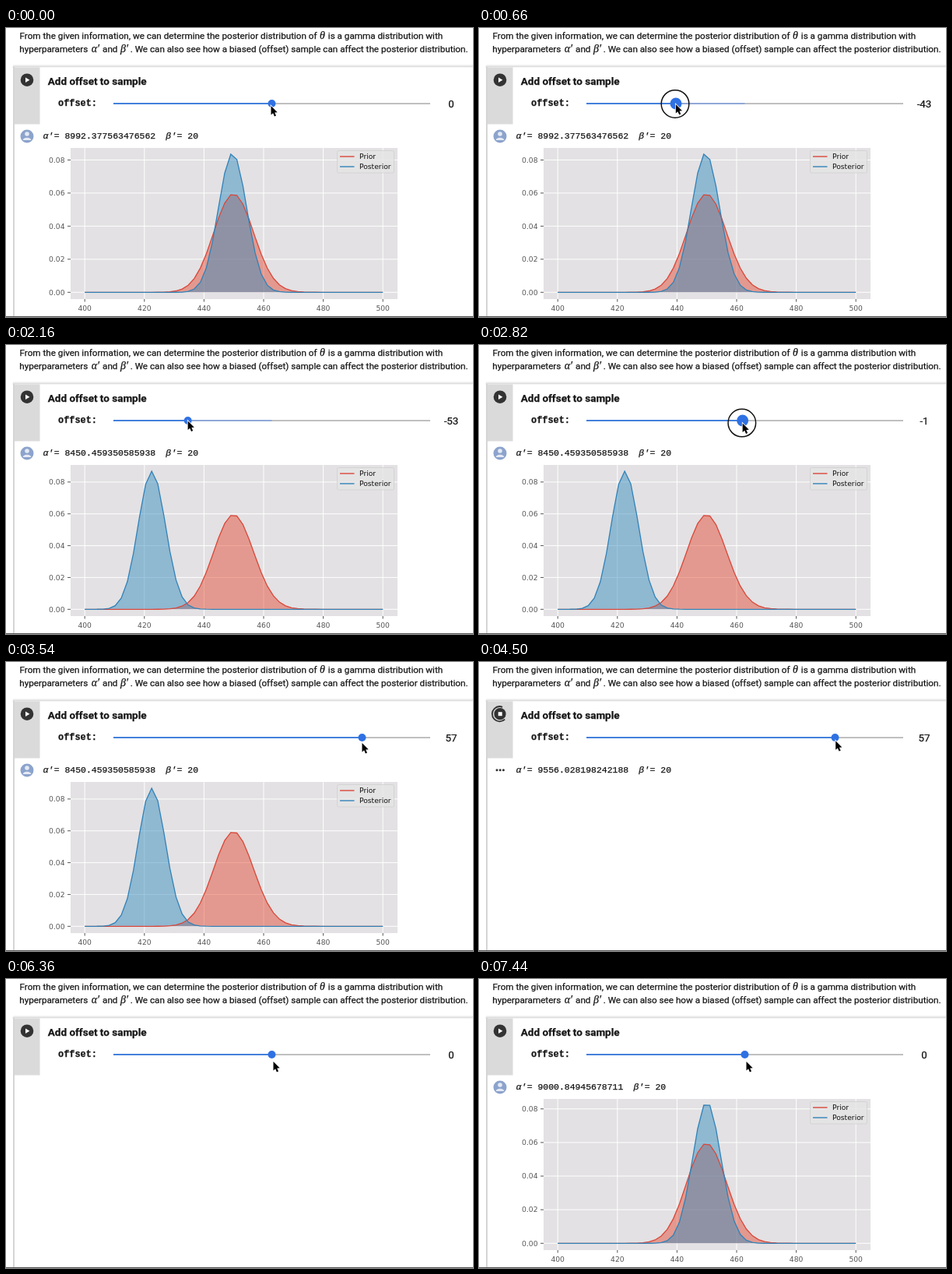
Recreate the animation shown at these times as an HTML page with a canvas. Size 600 by 371 pixels, loop 7.5 s.

```html
<!DOCTYPE html>
<html lang="en">
<head>
<meta charset="utf-8">
<style>
html, body { margin: 0; width: 100%; height: 100%; overflow: hidden; background: #fff; }
canvas { display: block; }
</style>
</head>
<body>
<canvas id="stage" width="600" height="371"></canvas>
<script>
const canvas = document.getElementById('stage');
const ctx = canvas.getContext('2d');
const ratio = window.devicePixelRatio || 1;
canvas.width = 600 * ratio;
canvas.height = 371 * ratio;
canvas.style.width = '600px';
canvas.style.height = '371px';

const LOOP = 7500;
const ROBOTO = 'Roboto, sans-serif';
const MATH = '"Liberation Serif", serif';
const MONO = '"Liberation Mono", monospace';
const DEJAVU = '"DejaVu Sans", sans-serif';
const INK = '#161616', BLUE = '#2f71e3', RED = '#d9473a', PLOT_BLUE = '#3182b8';

// time, offset value, pointer dx from the thumb, pointer y
const poses = [
  [0, 0, -1, 100], [150, 0, -1, 100], [850, -53, 0, 97.5], [2380, -53, 0, 97.5],
  [3300, 57, 0, 104], [3900, 57, 0, 104], [4300, 57, 0.7, 101.2], [4740, 57, 0.7, 101.2],
  [5597, 0, 0, 105], [5900, 0, 2, 106], [LOOP, 0, 2, 106]
];
const drags = [[100, 920], [2330, 3370], [4690, 5720]];
// Each run clears the output, starts the spinner, prints, then plots.
const runs = [
  { clear: -4, spin: -3, print: -2, plot: -1, alpha: '8992.377563476562', step: 0.02 },
  { clear: 1060, spin: 1500, print: 1860, plot: 2100, alpha: '8450.459350585938', step: 0.02 },
  { clear: 3620, spin: 3900, print: 4260, plot: 4640, alpha: '9556.028198242188', step: 0.01 },
  { clear: 6060, spin: 6600, print: 6960, plot: 7200, alpha: '9000.84945678711', step: 0.02 }
];

function poseAt(t) {
  const i = poses.findIndex(p => p[0] > t);
  const a = poses[i - 1], b = poses[i];
  const u = (t - a[0]) / (b[0] - a[0]);
  const k = u * u * (3 - 2 * u);
  return a.map((v, j) => v + (b[j] - v) * k);
}

function text(str, x, y, font, color = INK, align = 'left') {
  ctx.font = font;
  ctx.fillStyle = color;
  ctx.textAlign = align;
  ctx.fillText(str, x, y);
  if (color !== INK) return;
  // A hairline outline gives page text its slightly heavier weight.
  ctx.strokeStyle = color;
  ctx.lineWidth = 0.25;
  ctx.strokeText(str, x, y);
}

function rect(x, y, w, h, color) {
  ctx.fillStyle = color;
  ctx.fillRect(x, y, w, h);
}

function disc(x, y, r, color) {
  ctx.beginPath();
  ctx.arc(x, y, r, 0, 2 * Math.PI);
  ctx.fillStyle = color;
  ctx.fill();
}

function trace(points) {
  ctx.beginPath();
  points.forEach(([x, y]) => ctx.lineTo(x, y));
}

function stroke(points, color, width) {
  trace(points);
  ctx.strokeStyle = color;
  ctx.lineWidth = width;
  ctx.stroke();
}

function gammaPdf(x, alpha, beta) {
  const logGamma = (alpha - 0.5) * Math.log(alpha) - alpha + Math.log(2 * Math.PI) / 2 + 1 / (12 * alpha);
  return Math.exp(alpha * Math.log(beta) + (alpha - 1) * Math.log(x) - beta * x - logGamma);
}

function drawHeader() {
  const body = '11.7px ' + ROBOTO, math = 'italic 14px ' + MATH;
  text('From the given information, we can determine the posterior distribution of', 17.5, 13.8, body);
  text('θ', 403, 13.8, math);
  text('is a gamma distribution with', 413.8, 13.8, body);
  text('hyperparameters', 17.2, 30.9, body);
  const tail = '. We can also see how a biased (offset) sample can affect the posterior distribution.';
  text(tail, 593.5, 30.9, body, INK, 'right');
  const left = 593.5 - ctx.measureText(tail).width;
  text('β′', left - 2.5, 30.9, math, INK, 'right');
  text('and', left - 16.2, 30.9, body, INK, 'right');
  text('α′', left - 39.6, 30.9, math, INK, 'right');
}

function drawCard() {
  for (let i = 0; i < 4; i++) rect(9.5 - i / 3, 46.5 + i, 591, 1, `rgba(0,0,0,${0.02 + i * 0.045})`);
  rect(9, 50, 2, 320, '#d5d5d5');
  rect(11, 50.5, 589, 319.5, '#fff');
  rect(11, 50.5, 32.5, 73, '#dadada');
  rect(0, 370, 600, 1, '#555');
  text('Add offset to sample', 53.7, 72.7, 'bold 13.5px ' + ROBOTO);
  text('offset:', 67, 100, 'bold 11.9px ' + MONO);
}

function drawButton(t, running) {
  disc(27, 66.7, running ? 7.6 : 8.3, '#333');
  if (!running) {
    trace([[25, 63.4], [25, 70], [30.4, 66.7]]);
    ctx.fillStyle = '#fff';
    ctx.fill();
    return;
  }
  const turn = t / 1000 * 2 * Math.PI - 2.35;
  ctx.beginPath();
  ctx.arc(26.5, 66.7, 9.6, turn, turn + 4.3);
  ctx.strokeStyle = '#333';
  ctx.lineWidth = 1.8;
  ctx.stroke();
  rect(24.7, 64.2, 5, 5, '#fff');
}

function drawAvatar() {
  disc(27, 139, 8.5, '#8ca3cc');
  disc(27, 136, 2.8, '#e4eaf4');
  ctx.beginPath();
  ctx.ellipse(27, 144, 5.3, 3.2, 0, Math.PI, 0);
  ctx.fill();
}

function drawSlider(t, value, dragging) {
  const x = 341.5 + value * 2.035;
  rect(138, 96.2, 407, 1.8, '#b9b9b9');
  if (t > 150 && t < 2380) rect(x, 96.3, 341.5 - x, 1.4, '#7d9fe2');
  rect(138, 96, x - 138, 2, '#4480dc');
  disc(x, 97, dragging ? 7.5 : 5, BLUE);
  text(String(Math.round(value)), 572, 101.7, '13.3px ' + ROBOTO, INK, 'center');
  return x;
}

function drawPlot({ alpha, step }) {
  const font = '9.2px ' + DEJAVU, base = 339.3;
  const grid = Array.from({ length: 50 }, (_, i) => 400 + i * 100 / 49);
  const prior = grid.map(x => gammaPdf(x, 4500, 10));
  const posterior = grid.map(x => gammaPdf(x, +alpha, 20));
  const scale = (base - 162) / Math.max(...posterior);
  const px = x => 101.2 + (x - 400) * 3.83;

  rect(83, 154, 420, 194, '#e3e1e3');
  for (let x = 400; x <= 500; x += 20) {
    stroke([[px(x), 154], [px(x), 348]], '#fff', 1);
    stroke([[px(x), 348], [px(x), 351.5]], '#555', 1);
    text(String(x), px(x), 362.5, font, '#555', 'center');
  }
  for (let i = 0; i * step < 0.081; i++) {
    const y = base - i * step * scale;
    stroke([[83, y], [503, y]], '#fff', 1);
    stroke([[79, y], [83, y]], '#555', 1);
    text((i * step).toFixed(2), 75.5, y + 3.3, font, '#555', 'right');
  }

  const curves = [[prior, RED, 'rgba(226,74,51,.48)'], [posterior, PLOT_BLUE, 'rgba(52,138,189,.48)']]
    .map(([pdf, line, fill]) => ({ line, fill, points: pdf.map((p, i) => [px(grid[i]), base - p * scale]) }));
  for (const { points, fill } of curves) {
    trace(points);
    ctx.fillStyle = fill;
    ctx.fill();
  }
  for (const { points, line } of curves) stroke(points, line, 1.3);

  ctx.beginPath();
  ctx.roundRect(425.5, 157.5, 73, 28.5, 2);
  ctx.fillStyle = 'rgba(229,229,229,.8)';
  ctx.fill();
  ctx.strokeStyle = '#d0d0d0';
  ctx.lineWidth = 0.8;
  ctx.stroke();
  [['Prior', RED], ['Posterior', PLOT_BLUE]].forEach(([label, color], i) => {
    const y = 165 + i * 13;
    stroke([[429, y], [447.5, y]], color, 1.4);
    text(label, 454, y + 3.2, font, '#111');
  });
}

function drawOutput(t) {
  const next = runs.findIndex(r => r.clear > t);
  const run = runs[next < 0 ? runs.length - 1 : next - 1];
  drawButton(t, t >= run.spin && t < run.plot);
  if (t < run.print) return;
  const font = '11.45px ' + MONO;
  const gap = ' '.repeat(run.alpha.length + 4);
  text(`α′${gap}β′`, 47.5, 141.8, 'italic ' + font);
  text(`   = ${run.alpha}    = 20`.slice(1), 48 + 0, 141.8, font);
  if (t < run.plot) {
    for (let i = 0; i < 3; i++) disc(23 + i * 4.2, 138.8, 1.5, '#333');
  } else {
    drawAvatar();
    drawPlot(run);
  }
}

function drawPointer(x, y, dragging) {
  if (dragging) {
    ctx.beginPath();
    ctx.arc(x - 0.8, y - 0.5, 17.8, 0, 2 * Math.PI);
    ctx.strokeStyle = '#111';
    ctx.lineWidth = 1.5;
    ctx.stroke();
  }
  trace([[0, 0], [0, 11.5], [2.6, 9.2], [4.4, 13.4], [6.5, 12.5], [4.7, 8.5], [8.2, 8.3]]
    .map(([dx, dy]) => [x + dx, y + dy]));
  ctx.closePath();
  ctx.strokeStyle = '#fff';
  ctx.lineWidth = 1.6;
  ctx.stroke();
  ctx.fillStyle = '#000';
  ctx.fill();
}

function draw(t) {
  ctx.setTransform(ratio, 0, 0, ratio, 0, 0);
  rect(0, 0, 600, 371, '#fff');
  drawHeader();
  drawCard();
  drawOutput(t);
  const [, value, dx, y] = poseAt(t);
  const dragging = drags.some(([from, to]) => t >= from && t < to);
  const thumb = drawSlider(t, value, dragging);
  drawPointer(thumb + dx, y, dragging);
}

const start = performance.now();
function tick() {
  draw((performance.now() - start) % LOOP);
  requestAnimationFrame(tick);
}
tick();
</script>
</body>
</html>
```
